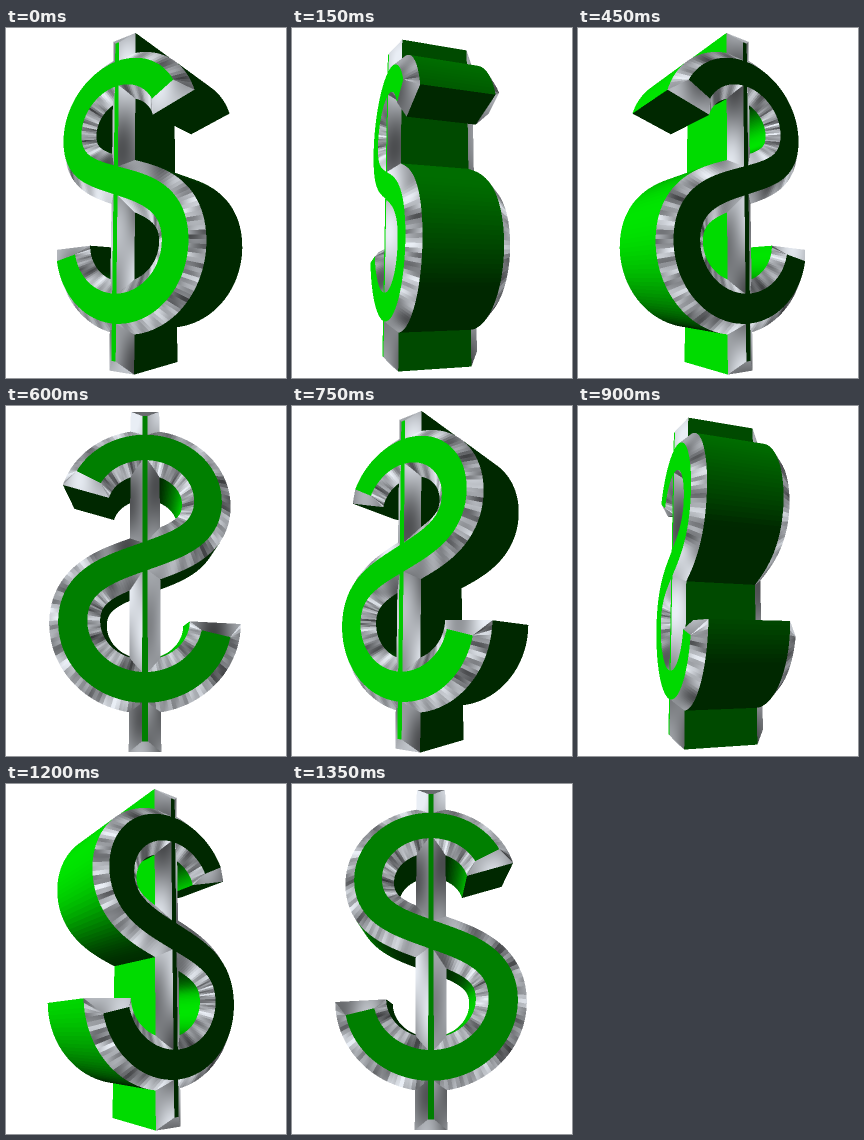
These frames come from a looping animation (280x350 px, 1.5 s). An HTML page with a canvas:

```html
<!DOCTYPE html>
<html lang="en">
<head>
<meta charset="utf-8">
<title>Spinning dollar</title>
<style>
  html, body { margin: 0; width: 100%; height: 100%; overflow: hidden; background: #fff; }
  canvas { display: block; width: 280px; height: 350px; }
</style>
</head>
<body>
<canvas id="stage" width="280" height="350"></canvas>
<script>
const W = 280, H = 350, SS = 2;
const STEPS = 10, STEP_MS = 150;
const CX = 139, CY = 171, CAMERA = 440, PITCH = 10 * Math.PI / 180;
const WALL_Z = 35, FACE_Z = 46;
const BW = W * SS, BH = H * SS;
const { sin, cos, min, max, hypot, floor, ceil, PI } = Math;

// Centre lines
function arc(cx, cy, rx, ry, from, to, n = 120) {
  return Array.from({ length: n + 1 }, (_, i) => {
    const a = (from + (to - from) * i / n) * PI / 180;
    return [cx + rx * cos(a), cy + ry * sin(a)];
  });
}

function bezier(p, n = 60) {
  return Array.from({ length: n }, (_, i) => {
    const t = (i + 1) / n, u = 1 - t;
    return [0, 1].map(k => u * u * u * p[0][k] + 3 * u * u * t * p[1][k] +
      3 * u * t * t * p[2][k] + t * t * t * p[3][k]);
  });
}

const sLine = [
  ...arc(0, 64, 58, 52, 14, 180),
  ...bezier([[-58, 64], [-58, 31], [-30, 22], [0, 11]]),
  ...bezier([[0, 11], [30, 0], [63.5, -10], [63.5, -46]]),
  ...arc(0, -46, 63.5, 58, 0, -178).slice(1)
];
const barLine = [[0, 159], [0, 0], [0, -159]];

// Returns a function giving the point at arc length s and offset d
function tracer(line) {
  const len = [0];
  for (let i = 1; i < line.length; i++) {
    len.push(len[i - 1] + hypot(line[i][0] - line[i - 1][0], line[i][1] - line[i - 1][1]));
  }
  const normals = line.map((_, i) => {
    const a = line[max(0, i - 1)], b = line[min(line.length - 1, i + 1)];
    const dx = b[0] - a[0], dy = b[1] - a[1], l = hypot(dx, dy);
    return [dy / l, -dx / l];
  });
  const at = (s, d) => {
    let i = 1;
    while (i < line.length - 1 && len[i] < s) i++;
    const t = (s - len[i - 1]) / (len[i] - len[i - 1]);
    return [0, 1].map(k => {
      const p = line[i - 1][k] + (line[i][k] - line[i - 1][k]) * t;
      const n = normals[i - 1][k] + (normals[i][k] - normals[i - 1][k]) * t;
      return p + n * d;
    });
  };
  return { at, total: len[len.length - 1] };
}

// Bevelled solid swept along a line; quads are { pts, chrome }
function sweep(line, half, faceHalf, inset, n) {
  const { at, total } = tracer(line), quads = [];
  const ring = s => {
    const f = min(max(s, inset), total - inset);
    const edge = (d, z) => [...at(s, d), z];
    const face = (d, z) => [...at(f, d), z];
    return [
      edge(half, WALL_Z), face(faceHalf, FACE_Z), face(-faceHalf, FACE_Z), edge(-half, WALL_Z),
      edge(-half, -WALL_Z), face(-faceHalf, -FACE_Z), face(faceHalf, -FACE_Z), edge(half, -WALL_Z)
    ];
  };
  const rings = Array.from({ length: n + 1 }, (_, i) => ring(total * i / n));
  for (let i = 0; i < n; i++) {
    const a = rings[i], b = rings[i + 1];
    for (let k = 0; k < 8; k++) {
      const m = (k + 1) % 8;
      quads.push({ pts: [a[k], a[m], b[m], b[k]], chrome: k % 2 === 0 });
    }
  }
  for (const r of [rings[0], rings[n]]) {
    quads.push({ pts: [r[0], r[1], r[2], r[3]], chrome: true });
    quads.push({ pts: [r[4], r[5], r[6], r[7]], chrome: true });
    quads.push({ pts: [r[0], r[3], r[4], r[7]], chrome: false });
  }
  return quads;
}

const solid = [
  ...sweep(sLine, 23, 12.8, 10.5, 190),
  ...sweep(barLine, 14, 2.4, 11, 40)
];

function toView([x, y, z], angle) {
  const c = cos(angle), s = sin(angle), cp = cos(PITCH), sp = sin(PITCH);
  const depth = x * s + z * c;
  return [x * c - z * s, y * cp + depth * sp, depth * cp - y * sp];
}

function toScreen([x, y, z]) {
  const k = CAMERA / (CAMERA - z);
  return [(CX + x * k) * SS, (CY - y * k) * SS, k];
}

// Unit normal turned towards the camera
function normalOf([a, b, c, d]) {
  const u = [0, 1, 2].map(k => c[k] - a[k]), v = [0, 1, 2].map(k => d[k] - b[k]);
  const n = [u[1] * v[2] - u[2] * v[1], u[2] * v[0] - u[0] * v[2], u[0] * v[1] - u[1] * v[0]];
  const mid = [0, 1, 2].map(k => (a[k] + b[k] + c[k] + d[k]) / 4);
  const facing = -n[0] * mid[0] - n[1] * mid[1] + n[2] * (CAMERA - mid[2]);
  const l = (hypot(...n) || 1) * (facing < 0 ? -1 : 1);
  return n.map(q => q / l);
}

const rgb = (r, g, b) => (255 << 24 | b << 16 | g << 8 | r) >>> 0;

function greenShade([nx, ny, nz]) {
  const g = 40 + max(0, -158 * nx + 75 * ny + 76 * nz);
  return rgb(0, min(235, g), 0);
}

// Streaky metal that follows the direction of the bevel
function chromeShade([nx, ny]) {
  const a = Math.atan2(ny, nx);
  return (px, py) => {
    const x = px / SS, y = py / SS;
    let g = 155 - 22 * nx + 38 * sin(7 * a + y * 0.03) +
      30 * sin(19 * a - x * 0.09 + y * 0.035) + 20 * sin(37 * a + x * 0.13 + y * 0.05);
    g = min(238, max(50, g));
    return rgb(g * 0.98, g, min(255, g * 1.03));
  };
}

function fillTriangle(a, b, c, color, pixels, depth) {
  const area = (b[0] - a[0]) * (c[1] - a[1]) - (b[1] - a[1]) * (c[0] - a[0]);
  if (Math.abs(area) < 1e-6) return;
  const x0 = max(0, floor(min(a[0], b[0], c[0]))), x1 = min(BW - 1, ceil(max(a[0], b[0], c[0])));
  const y0 = max(0, floor(min(a[1], b[1], c[1]))), y1 = min(BH - 1, ceil(max(a[1], b[1], c[1])));
  const shader = typeof color === "function";
  for (let y = y0; y <= y1; y++) {
    for (let x = x0; x <= x1; x++) {
      const px = x + 0.5, py = y + 0.5;
      const u = ((b[0] - px) * (c[1] - py) - (b[1] - py) * (c[0] - px)) / area;
      const v = ((c[0] - px) * (a[1] - py) - (c[1] - py) * (a[0] - px)) / area;
      const w = 1 - u - v;
      if (u < -1e-6 || v < -1e-6 || w < -1e-6) continue;
      const k = u * a[2] + v * b[2] + w * c[2], i = y * BW + x;
      if (k <= depth[i]) continue;
      depth[i] = k;
      pixels[i] = shader ? color(px, py) : color;
    }
  }
}

function render(step) {
  const angle = (step + 1) * 2 * PI / STEPS;
  const sheet = document.createElement("canvas");
  sheet.width = BW;
  sheet.height = BH;
  const sheetCtx = sheet.getContext("2d");
  const image = sheetCtx.createImageData(BW, BH);
  const pixels = new Uint32Array(image.data.buffer).fill(0xffffffff);
  const depth = new Float32Array(BW * BH);
  for (const { pts, chrome } of solid) {
    const view = pts.map(p => toView(p, angle));
    const n = normalOf(view), [a, b, c, d] = view.map(toScreen);
    const color = chrome ? chromeShade(n) : greenShade(n);
    fillTriangle(a, b, c, color, pixels, depth);
    fillTriangle(a, c, d, color, pixels, depth);
  }
  sheetCtx.putImageData(image, 0, 0);
  return sheet;
}

const ctx = document.getElementById("stage").getContext("2d");
const poses = Array.from({ length: STEPS }, (_, i) => render(i));
const start = performance.now();
let shown = -1;

function draw(now) {
  const step = floor(max(0, now - start) / STEP_MS) % STEPS;
  if (step !== shown) {
    ctx.drawImage(poses[step], 0, 0, W, H);
    shown = step;
  }
  requestAnimationFrame(draw);
}
draw(start);
</script>
</body>
</html>
```
